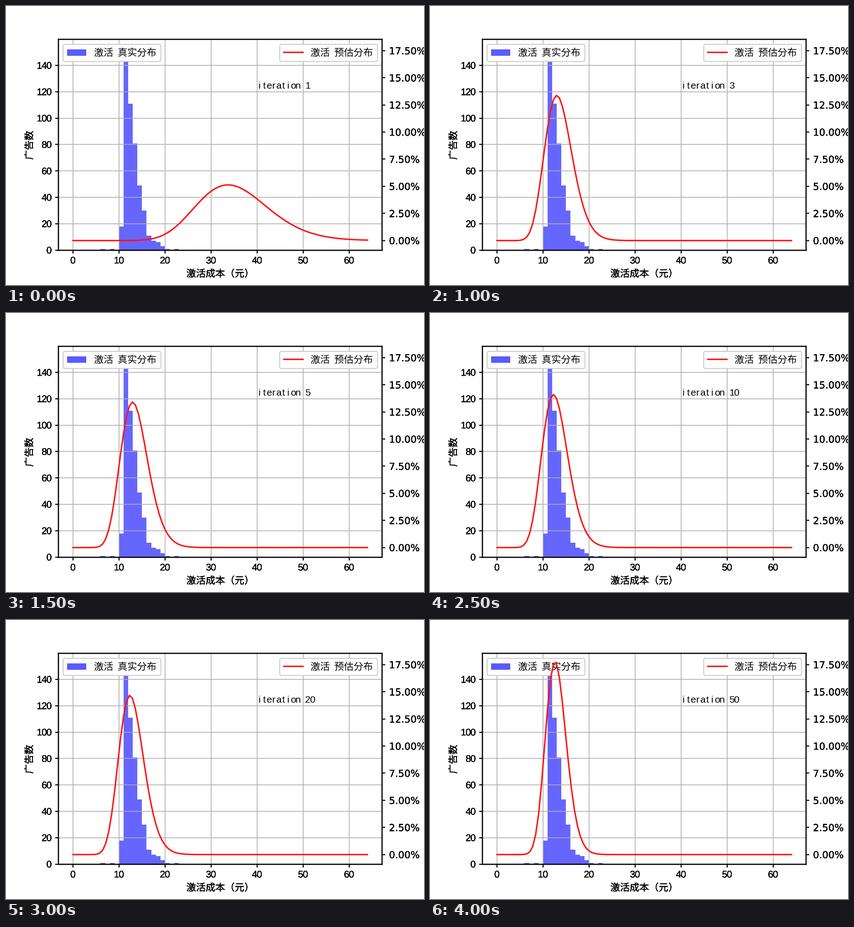
Recreate the animation shown at these times as a matplotlib script. Size 917x611 px, loop 4500 ms.

```python
import numpy as np
import matplotlib.pyplot as plt
from matplotlib.animation import FuncAnimation
from matplotlib.patches import FancyBboxPatch, Rectangle
from matplotlib.patheffects import Normal
from matplotlib.ticker import PercentFormatter
from matplotlib.transforms import Affine2D

W, H, DPI = 917, 611, 152.8
CELL = 10.61                      # half-width character pitch, px
RED, BLUE = "#ff1515", "#6666ff"
HEAVY = [Normal()] * 4            # repeated drawing firms up the glyph edges

# iteration, mode and peak density of the fitted gamma curve
STEPS = [
    (1, 33.70, 0.0513), (2, 18.50, 0.0940), (3, 13.00, 0.1338),
    (5, 12.95, 0.1342), (6, 12.90, 0.1346), (10, 12.28, 0.1411),
    (20, 12.38, 0.1468), (30, 12.48, 0.1556), (50, 12.60, 0.1780),
]
COUNTS = [1, 0, 1, 0, 18, 152, 111, 81, 49, 30, 11, 7, 6, 3, 1, 0, 1]

fig = plt.figure(figsize=((W + 0.001) / DPI, (H + 0.001) / DPI), dpi=DPI,
                 facecolor="white")
px = Affine2D().scale(1 / W, -1 / H).translate(0, 1) + fig.transFigure

ax = fig.add_axes([0.125, 0.125, 0.775, 0.755])
ax2 = ax.twinx()


def cjk(host, x, y, s, **kw):
    return host.text(x, y, s, transform=px, family="Noto Sans CJK JP",
                     size=10, va="baseline", zorder=6, **kw)


def cells(host, x, y, s, **kw):
    """Set one character per half-width cell, starting at pixel x."""
    return [host.text(x + (i + 0.5) * CELL, y, c, transform=px, size=10,
                      family="Liberation Sans", ha="center", va="baseline",
                      zorder=6, **kw)
            for i, c in enumerate(s)]


def legend_box(host, x, label):
    host.add_patch(FancyBboxPatch(
        (x, 84), 214.5, 37.5, boxstyle="round,pad=0,rounding_size=4",
        transform=px, fc="white", ec="#cccccc", lw=1, zorder=5,
        clip_on=False))
    cjk(host, x + 67.7, 109.6, label)


def gamma_curve(x, mode, peak):
    n = 2 * np.pi * (peak * mode) ** 2
    r = x / mode
    return peak * r ** n * np.exp(n * (1 - r))


# Histogram and axes
ax.stairs(COUNTS, np.arange(6, 24), fill=True, color=BLUE, lw=0)
ax.set_xlim(-3.2, 67.2)
ax.set_ylim(0, 159.6)
ax.set_xticks(range(0, 61, 10))
ax.set_yticks(range(0, 141, 20))
ax.grid(True, color="#b0b0b0", lw=0.8)
ax.tick_params(labelbottom=False, labelleft=False, width=1.1, length=3.5)

ax2.set_ylim(-0.00882, 0.18532)
ax2.set_yticks(np.arange(8) * 0.025)
ax2.yaxis.set_major_formatter(PercentFormatter(1, decimals=2))
ax2.tick_params(width=1.1, length=3.5, pad=3.5, labelsize=10,
                labelfontfamily="DejaVu Sans")
for label in ax2.get_yticklabels():
    label.set_path_effects(HEAVY)
for a in (ax, ax2):
    for spine in a.spines.values():
        spine.set_linewidth(1.1)

# Tick labels and axis titles
for v in range(0, 61, 10):
    s = str(v)
    left = 146.9 + 10.095 * v - len(s) * CELL / 2
    cells(ax, left, 564, s, path_effects=HEAVY)
for v in range(0, 141, 20):
    s = str(v)
    cells(ax, 99.9 - len(s) * CELL, 542 - 2.89 * v, s, path_effects=HEAVY)
cjk(ax, 470, 593, "激活成本（元）", ha="center", path_effects=HEAVY)
cjk(ax, 58, 305, "广告数", ha="center", rotation=90,
    rotation_mode="anchor", path_effects=HEAVY)

# Legends
legend_box(ax, 125.3, "激活  真实分布")
ax.add_patch(Rectangle((133.8, 94.6), 42.4, 14.6, transform=px,
                       fc="#5a5aff", lw=0, zorder=6, clip_on=False))
legend_box(ax2, 600.5, "激活  预估分布")
ax2.plot([609, 651.4], [101.5, 101.5], transform=px, color=RED, lw=1.5,
         zorder=6, clip_on=False)

# Moving parts
xs = np.linspace(0, 64, 100)
curve, = ax2.plot([], [], color=RED, lw=1.5)
note = cells(ax2, 550.4, 181, " " * 12)
ax2.set_xlim(-3.2, 67.2)
ax2.set_ylim(-0.00882, 0.18532)


def update(i):
    step, mode, peak = STEPS[i]
    curve.set_data(xs, gamma_curve(xs, mode, peak))
    for cell, c in zip(note, f"iteration {step}".ljust(12)):
        cell.set_text(c)
    return [curve, *note]


anim = FuncAnimation(fig, update, frames=len(STEPS), interval=500,
                     init_func=lambda: update(0), repeat=True,
                     repeat_delay=0, blit=False)
plt.show()
```
